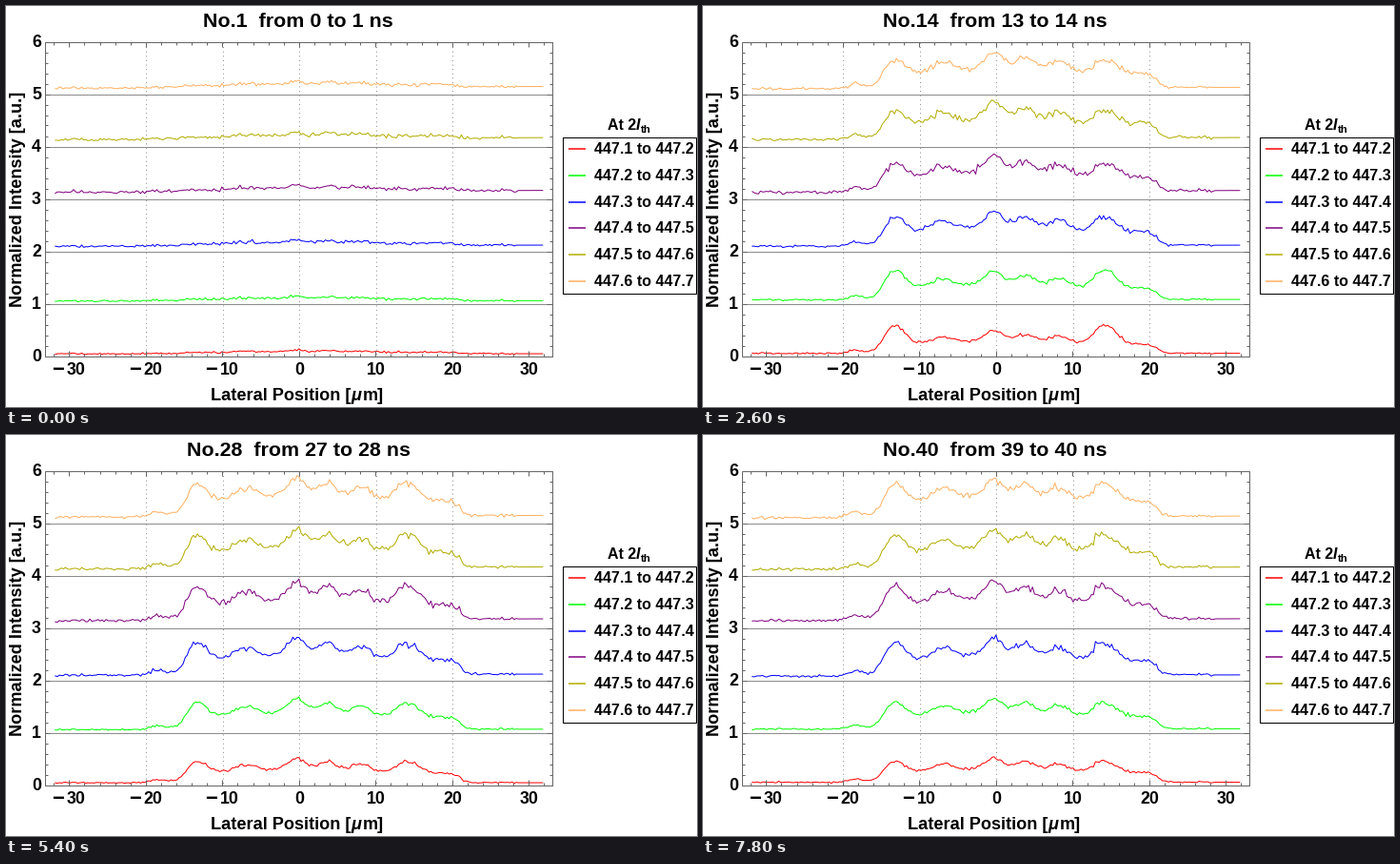
Recreate the animation shown at these times as a matplotlib script. Size 726 by 421 pixels, loop 8 s.

```python
import numpy as np
import matplotlib.pyplot as plt
from matplotlib.animation import FuncAnimation
from matplotlib.patches import Rectangle

W, H, DPI = 726, 421, 100
FRAMES, INTERVAL = 40, 200
LEFT, RIGHT, TOP, BOTTOM = 40.5, 573.5, 37.5, 367.5
COLORS = ["#ff0000", "#00ff00", "#0000ff", "#800080", "#b2ac00", "#ffb060"]
GRAY = "#666666"

plt.rcParams["font.family"] = "Liberation Sans"

fig = plt.figure(figsize=(W / DPI, H / DPI), dpi=DPI, facecolor="white")
ax = fig.add_axes([0, 0, 1, 1])
ax.set_xlim(0, W)
ax.set_ylim(H, 0)
ax.axis("off")


def pt(px):
    return px * 72 / DPI


def sx(x):
    return 307.8 + 8.05 * x


def sy(v):
    return BOTTOM - 55 * v


def line(x0, y0, x1, y1, color=GRAY, width=1.0, **kw):
    ax.plot([x0, x1], [y0, y1], color=color, lw=pt(width),
            solid_capstyle="butt", **kw)


def label(x, y, text, size, ha="left", **kw):
    return ax.text(x, y, text, fontsize=pt(size), ha=ha, va="baseline",
                   weight="bold", color="black", **kw)


def draw_frame():
    for v in range(1, 6):
        line(LEFT, sy(v), RIGHT, sy(v), "#8c8c8c", zorder=1)
    for x in range(-20, 21, 10):
        px = np.floor(sx(x)) + 0.5
        line(px, TOP, px, BOTTOM, "#8c8c8c", zorder=1, dashes=(1, 3.6))
    ax.add_patch(Rectangle((LEFT, TOP), RIGHT - LEFT, BOTTOM - TOP,
                           fill=False, ec=GRAY, lw=pt(1), zorder=4))
    for x in range(-32, 33, 2):
        n = 5.5 if x % 10 == 0 else 3
        line(sx(x), BOTTOM, sx(x), BOTTOM - n, zorder=4)
        line(sx(x), TOP, sx(x), TOP + n, zorder=4)
    for k in range(31):
        n = 5.5 if k % 5 == 0 else 3
        line(LEFT, sy(k / 5), LEFT + n, sy(k / 5), zorder=4)
        line(RIGHT, sy(k / 5), RIGHT - n, sy(k / 5), zorder=4)


def draw_labels():
    for x in range(-30, 31, 10):
        shift = 7.5 if x < 0 else 0.7
        label(sx(x) + shift, 387, str(abs(x)), 17.8, "center")
        if x < 0:
            label(sx(x) - 11.5, 388.4, "\u2212", 22, "center")
    for v in range(7):
        label(37, sy(v) + 5.7, str(v), 17.8, "right")
    label(215.3, 414, "Lateral Position [", 18.1)
    label(362.5, 414, "\u03bc", 18.1, style="italic")
    label(396.8, 414, "m]", 18.1, "right")
    label(17, 203, "Normalized Intensity [a.u.]", 18.1, "center",
          rotation=90, rotation_mode="anchor")


def draw_legend():
    label(632, 130, "At 2", 16)
    label(662, 130, "I", 16, style="italic")
    label(667, 133, "th", 11.5)
    ax.add_patch(Rectangle((584.5, 137.5), 140, 164, fill=False,
                           ec="black", lw=pt(1)))
    for c, color in enumerate(COLORS):
        y = 150 + 27.8 * c
        line(590.5, y, 609, y, color, 1.5)
        label(618, y + 5, f"447.{c + 1} to 447.{c + 2}", 16)


X = np.linspace(-31.8, 31.8, 241)
LIVE = X < 28.4


def bump(center, width, height):
    return height * np.exp(-((X - center) / width) ** 2)


def logistic(u):
    return 1 / (1 + np.exp(-u))


# Light inside the stripe, and the two lobes near its edges
STRIPE = 0.18 * (logistic((X + 15) * 2) - logistic((X - 21.2) * 2.5))
INNER = (STRIPE + bump(0, 9, 0.07) + bump(-18.3, 1.4, 0.06)
         + bump(-7, 1.9, 0.13) + bump(-0.3, 1.7, 0.21)
         + bump(3.8, 1.7, 0.16) + bump(8.2, 1.7, 0.15))
LOBES = bump(-13.2, 1.8, 0.22) + bump(14.2, 2, 0.22)

# Bands away from the first one are brighter, higher and noisier
BAND = np.arange(6)
EXTRA = np.clip(0.45 * BAND, 0, 1)
SWELL = np.sin(np.pi * BAND / 7.5) ** 2
FIXED = np.random.default_rng(5).normal(size=X.size)


def profiles(t):
    """Six noisy curves at time t in ns, each on its own integer offset."""
    rng = np.random.default_rng(100 + t)
    common = rng.normal(size=X.size)
    inner = 0.14 + 0.86 * logistic((t - 9.3) / 1.6)
    lobes = logistic(t - 10)
    burst = np.exp(-((t - 14) / 5) ** 2)
    for c in BAND:
        flare = 1 + (0.8 - EXTRA[c]) * burst
        signal = (1 + 0.58 * EXTRA[c]) * (INNER * inner + LOBES * lobes * flare)
        slope = 0.10 + 0.02 * X / 32
        noise = 0.014 + 0.014 * SWELL[c]
        floor = 0.05 + slope * SWELL[c] + rng.normal() * noise * 0.4
        grain = 0.5 * FIXED + 0.5 * common + 0.7 * rng.normal(size=X.size)
        grain = grain * noise * (0.5 + np.sqrt(signal)) * LIVE
        yield c + floor + signal + grain


draw_frame()
draw_labels()
draw_legend()
title = label(307, 22, "", 21.4, "center")
lines = [ax.plot([], [], color=color, lw=pt(1), zorder=3)[0] for color in COLORS]


def update(i):
    title.set_text(f"No.{i + 1}  from {i} to {i + 1} ns")
    for curve, values in zip(lines, profiles(i)):
        curve.set_data(sx(X), sy(values))
    return [title, *lines]


anim = FuncAnimation(fig, update, frames=FRAMES, interval=INTERVAL,
                     init_func=lambda: update(0), repeat=True, repeat_delay=0)
plt.show()
```
